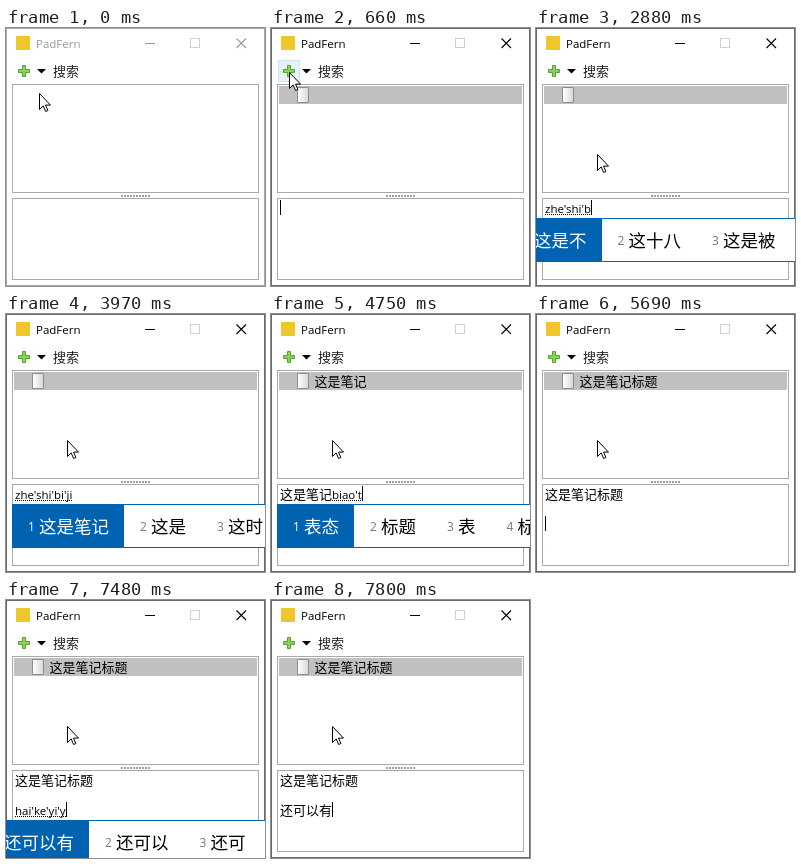
These frames come from a looping animation (259 px wide and 258 px high, 8 s). An HTML page:

```html
<!DOCTYPE html>
<html lang="zh-CN">
<head>
<meta charset="utf-8">
<title>PadFern</title>
<style>
  html, body { margin: 0; width: 100%; height: 100%; overflow: hidden; background: #fff; }
  body { font: 13px/15px "Noto Sans CJK SC", "Noto Sans CJK", sans-serif; color: #000; }
  #stage { position: relative; width: 259px; height: 258px; overflow: hidden; --ink: #000; --edge: #6a6a6a; }
  #stage.idle { --ink: #999; --edge: #aaa; }
  #stage > * { position: absolute; white-space: pre; }
  svg { left: 0; top: 0; overflow: visible; }
  .latin, #comp { font: 11.5px/15px "Open Sans", "Noto Sans", sans-serif; }
  #title { left: 30px; top: 8px; color: var(--ink); }
  #search { left: 47px; top: 35px; color: #222; }
  #hover { left: 7px; top: 32px; width: 20px; height: 20px; background: #e5f1fb; border: 1px solid #cce4f7; }
  #row { left: 8px; top: 58px; width: 243px; height: 18px; background: #c0c0c0; }
  #row i { position: absolute; left: 18px; top: 1px; width: 10px; height: 14px; border: 1px solid #8c8c8c;
    border-radius: 1px; background: linear-gradient(90deg, #fff, #d8d8d8); }
  #name { position: absolute; left: 35.5px; top: 1px; }
  #line { left: 9px; display: flex; height: 15px; }
  #comp { position: relative; top: 1px; height: 14px;
    background: repeating-linear-gradient(90deg, #000 0 1px, transparent 1px 2px) 0 100% / 100% 1px no-repeat; }
  #caret { width: 1px; background: #000; }
  #note { left: 9px; top: 172px; }
  #bar { display: flex; box-sizing: border-box; height: 44px; background: #fff;
    border: solid #0063b1; border-width: 1px 0; font-size: 17.5px; line-height: 42px; }
  #bar span { flex: none; padding: 0 15px 0 16px; display: flex; }
  #bar b { width: 11px; font: 12px/44px "Open Sans", sans-serif; color: #777; }
  #bar span:first-child { background: #0063b1; color: #fff; }
  #bar span:first-child b { color: #fff; }
</style>
</head>
<body>
<div id="stage">
  <div id="hover"></div>
  <svg width="259" height="258" fill="none">
    <rect x=".5" y=".5" width="258" height="257" style="stroke:var(--edge)"/>
    <rect x="10" y="8" width="14" height="14" fill="#f0c62d"/>
    <g style="stroke:var(--ink)">
      <path d="M139 15.5h10"/>
      <path d="M230.5 10.5l9.5 9.5m0-9.5l-9.5 9.5" stroke-width="1.1"/>
    </g>
    <rect x="184.5" y="10.5" width="9" height="9" stroke="#d0d0d0"/>
    <path d="M16.5 37.5h3v4h4v3h-4v4h-3v-4h-4v-3h4z" fill="#8fd05a" stroke="#55a630"/>
    <path d="M31 41h9l-4.5 4.5z" fill="#000"/>
    <g stroke="#a9a9ad">
      <rect x="6.5" y="56.5" width="246" height="108"/>
      <rect x="6.5" y="170.5" width="246" height="81"/>
    </g>
    <path d="M115 168h30" stroke="#a0a0a0" stroke-width="2" stroke-dasharray="2 1"/>
  </svg>
  <div id="title" class="latin">PadFern</div>
  <div id="search">搜索</div>
  <div id="row"><i></i><span id="name"></span></div>
  <div id="note"></div>
  <div id="line"><span id="text"></span><span id="comp"></span><span id="caret"></span></div>
  <div id="bar"></div>
  <svg id="mouse" width="13" height="20">
    <path d="M.5 .5v16l3.7-3.6 2.4 5.6 2.3-1-2.4-5.4h5z" fill="#fff" stroke="#000"/>
  </svg>
</div>
<script>
const LOOP = 8000;
const el = Object.fromEntries([...document.querySelectorAll('[id]')].map(e => [e.id, e]));

const HEAD = '这是笔记', FULL = '这是笔记标题';
// Each step: time, line number, committed text, composition, candidates, extra state
const steps = [
  [0, 0, '', '', '', { caret: false }],
  [660, 0, '', '', ''],
  [1170, 0, '', '', '', { caret: false }],
  [1720, 0, '', 'z', ''],
  [1800, 0, '', 'zh', '这 中 种 只 找'],
  [2100, 0, '', 'zhe', '这 着 者 折 哲'],
  [2330, 0, '', "zhe'sh", '这是 这时 这事 这 着'],
  [2560, 0, '', "zhe'shi", '这是 这时 这事 这 着'],
  [2880, 0, '', "zhe'shi'b", '这是不 这十八 这是被 这是', { x: -29 }],
  [3110, 0, '', "zhe'shi'bi", '这是比 这是笔 这是 这时'],
  [3340, 0, '', "zhe'shi'bi'j", '这是比较 这是 这时 这事'],
  [3490, 0, '', "zhe'shi'bi'ji", '这是笔记 这是 这时 这事'],
  [3970, 0, '', "zhe'shi'bi'ji", '这是笔记 这是 这时 这事', { caret: false }],
  [4040, 0, HEAD, '', ''],
  [4260, 0, HEAD, 'b', '不 吧 把 被 比'],
  [4420, 0, HEAD, 'biao', '表 标 彪 飙 镖'],
  [4600, 0, HEAD, "biao't", '表态 标题 表 标'],
  [4800, 0, HEAD, "biao'ti", '标题 表体 表 标'],
  [4970, 0, FULL, '', ''],
  [5520, 1, '', '', ''],
  [5690, 2, '', '', ''],
  [5990, 2, '', 'h', '和 好 会 还 很'],
  [6310, 2, '', 'hai', '还 海 害 嗨 孩'],
  [6620, 2, '', "hai'k", '还可 海口 还看 还'],
  [6790, 2, '', "hai'ke", '还可 骇客 海科 还'],
  [6980, 2, '', "hai'ke'y", '还可以 还可 骇客 海科'],
  [7170, 2, '', "hai'ke'yi", '还可以 还可 骇客 海科'],
  [7480, 2, '', "hai'ke'yi'y", '还可以有 还可以 还可 骇客', { x: -29 }],
  [7640, 2, '', "hai'ke'yi'you", '还可以有 还可以 还可 骇客'],
  [7800, 2, '还可以有', '', '']
];

function showStep([time, line, text, comp, candidates, { x = 6, caret = true } = {}]) {
  const top = 172 + 15 * line;
  el.row.hidden = time < 660;
  el.note.textContent = line ? FULL : '';
  el.name.textContent = line ? FULL : text;
  el.line.style.top = top + 'px';
  el.text.textContent = text;
  el.comp.textContent = comp;
  el.caret.style.opacity = +caret;
  el.bar.style.cssText = `left:${x}px; top:${top + 18}px; width:${300 - x}px;` + (candidates ? '' : 'display:none');
  el.bar.innerHTML = candidates.split(' ').map((word, i) => `<span><b>${i + 1}</b>${word}</span>`).join('');
}

// Progress in equal jumps, the first one happening at the start time
const jumps = (t, start, gap, count) =>
  Math.min(count, Math.max(0, Math.floor((t - start) / gap) + 1)) / count;

function showMouse(t) {
  const toButton = jumps(t, 80, 80, 3), away = jumps(t, 940, 76.6, 7);
  const x = Math.round(33 - 15 * toButton + 43 * away);
  const y = Math.round(65 - 21 * toButton + 82 * away);
  el.mouse.style.transform = `translate(${x}px, ${y}px)`;
  el.hover.hidden = x > 28 || y > 53;
}

let current;
function render(now) {
  const t = now % LOOP;
  const step = steps.findLast(s => s[0] <= t);
  if (step !== current) showStep(current = step);
  el.stage.classList.toggle('idle', t < 400);
  showMouse(t);
}

const origin = performance.now();
function frame() {
  render(performance.now() - origin);
  requestAnimationFrame(frame);
}
frame();
</script>
</body>
</html>
```
